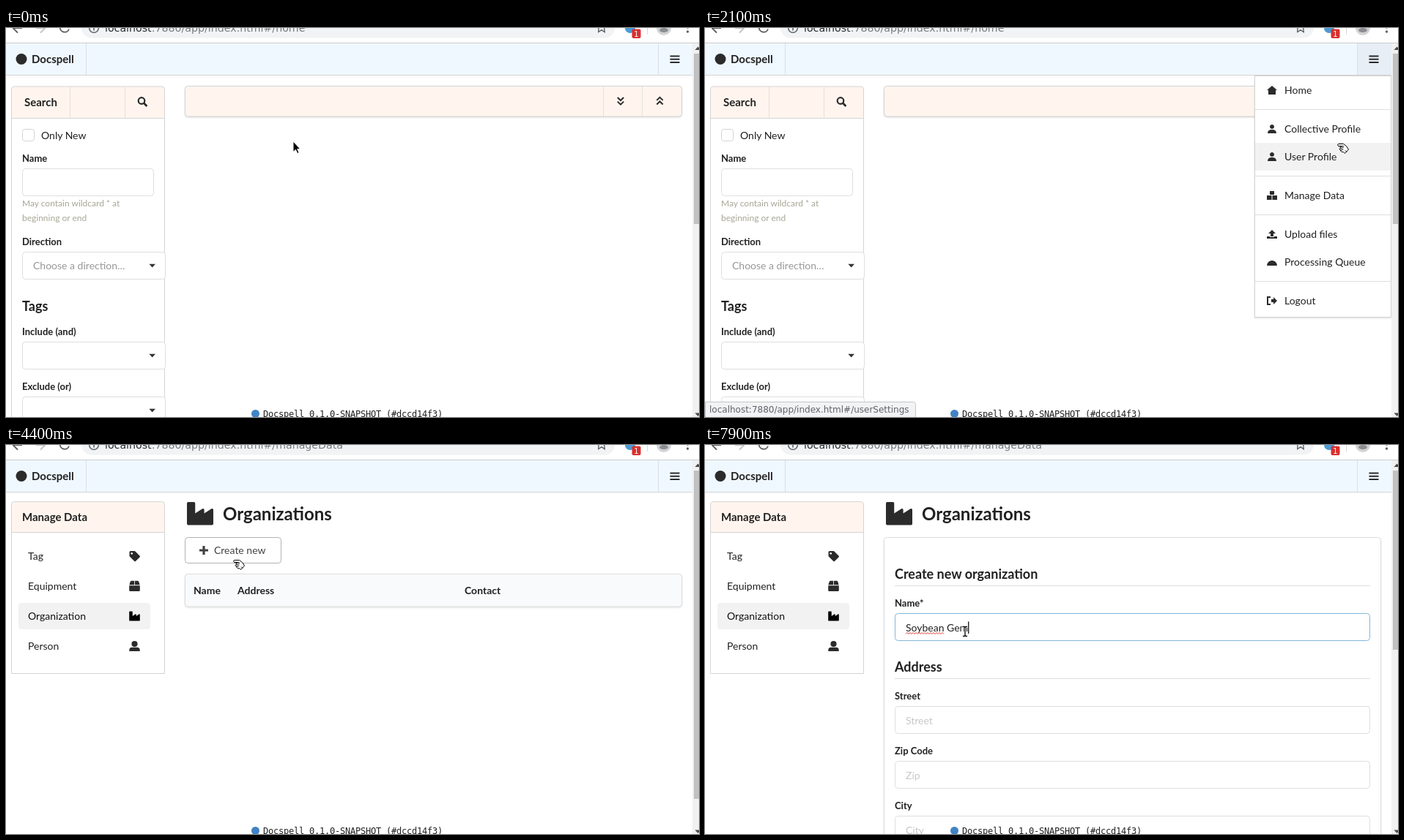
Write an HTML page that moves like this. It is 946 px wide and 532 px high and loops after 8 s.

```html
<!DOCTYPE html>
<html lang="en">
<head>
<meta charset="utf-8">
<title>Manage Data</title>
<style>
  html, body { margin: 0; width: 100%; height: 100%; overflow: hidden; background: #fff; }
  svg { display: block; }
  text { font: 14px Lato, sans-serif; fill: #212121; white-space: pre; }
  .b13 { font-weight: 700; font-size: 13px; }
  .b14 { font-weight: 700; }
  .b15 { font-weight: 700; font-size: 15px; }
  .b18 { font-weight: 700; font-size: 18px; }
  .b24 { font-weight: 700; font-size: 24px; }
  .hint { font-size: 12px; fill: #a8a696; }
  .ph { fill: #c7c7c7; }
  .ui { font-family: "DejaVu Sans", sans-serif; }
  .mono { font: 12px "DejaVu Sans Mono", monospace; letter-spacing: -.224px; }
  .box { fill: #fff; stroke: #dededf; }
  .card { fill: #fff; stroke: #d4d4d5; }
  .warm { fill: #fff5ee; stroke: #d4d4d5; }
  .rule { stroke: #dededf; fill: none; }
  .lift { filter: drop-shadow(0 1px 1px rgba(34,36,38,.15)); }
  .pop { filter: drop-shadow(0 1px 2px rgba(0,0,0,.35)); }
  .ico { fill: #2b2b2b; }
  .line { fill: none; stroke: #2b2b2b; stroke-width: 2; }
</style>
</head>
<body>
<svg width="946" height="532" viewBox="0 0 946 532">
  <defs>
    <path id="industry" d="M475 164L336 252V184C336 165 315 154 299 164L160 252V56Q160 32 136 32H24Q0 32 0 56V456Q0 480 24 480H488Q512 480 512 456V184C512 165 491 154 475 164Z"/>
    <path id="drop" d="M0 0h8.6l-4.3 4.6z" fill="#333"/>
    <path id="chevrons" class="line" d="M.8 1l4.2 4 4.2-4M.8 6.6l4.2 4 4.2-4"/>
  </defs>

  <!-- browser bar -->
  <rect x="103" y="-15" width="728" height="28.500" rx="14" fill="#f1f3f4"/>
  <g fill="none" stroke="#5f6368" stroke-width="1.900">
    <path d="M16 6.500L9.500 0M9 0H22"/>
    <path d="M47 6.500L53.500 0M41 0H54" stroke="#c4c6c8"/>
    <path d="M73.800-1A6.300 6.300 0 0 0 86 1.500"/>
    <circle cx="120" cy="0" r="6.300" stroke-width="1.500"/>
    <path d="M120-1v4.500" stroke-width="1.600"/>
    <path d="M809-2.500L808.800 5.500 813 2.700 817.200 5.500 816.500-2.500" stroke-width="1.400"/>
  </g>
  <text class="ui" x="135" y="5" style="font-size:14.200px;fill:#777b80"><tspan fill="#27292c">localhost</tspan>:7880/app/index.html#/<tspan id="page">home</tspan></text>
  <circle cx="852" cy="0" r="7" fill="#4a9bd4"/>
  <rect x="854.500" y="1.500" width="12" height="12.500" rx="2" fill="#d8302f"/>
  <text class="ui" x="857.300" y="11.500" style="font-size:10px;fill:#fff">1</text>
  <path d="M875.500 0V9" stroke="#d5d7da"/>
  <circle cx="898" cy="0" r="10" fill="#d2d3d5"/>
  <ellipse cx="898" cy="3" rx="6" ry="3" fill="#8b8d90"/>
  <circle cx="930.500" cy="5" r="1.700" fill="#5f6368"/>
  <circle cx="930.500" cy="-1" r="1.700" fill="#5f6368"/>

  <!-- page header -->
  <rect y="20" width="946" height="1" fill="#c9cbcd"/>
  <rect y="21" width="937" height="43" fill="#f0f8ff"/>
  <rect id="barsBg" x="891" y="21" width="46" height="43" fill="#000" opacity=".04"/>
  <path d="M0 64.500H937" stroke="#d4d4d5"/>
  <path d="M109.500 21V64M890.500 21V64" stroke="#d9dfe5"/>
  <circle cx="21" cy="42.500" r="7.500" class="ico"/>
  <text class="b15" x="35" y="48">Docspell</text>
  <path d="M906.500 38.500h13M906.500 42.700h13M906.500 47h13" class="line"/>

  <!-- search page -->
  <g id="search">
    <path class="card" d="M7.500 120V540H216.500V120"/>
    <path class="warm" d="M7.500 123.500V84a4 4 0 0 1 4-4H212.500a4 4 0 0 1 4 4V123.500Z"/>
    <path d="M87.500 80V123M162.500 80V123" stroke="#e6dfd9"/>
    <text class="b15" x="25" y="107">Search</text>
    <g class="line" style="stroke-width:2.200"><circle cx="185" cy="99.500" r="4.300"/><path d="M188 102.600l4.400 4.400" stroke-width="2.800"/></g>
    <rect class="card" x="22.500" y="138.500" width="16" height="16" rx="3"/>
    <text x="48" y="152">Only New</text>
    <text class="b13" x="22" y="183">Name</text>
    <rect class="box" x="22.500" y="192.500" width="179" height="37" rx="4"/>
    <text class="hint" x="22" y="244">May contain wildcard * at</text>
    <text class="hint" x="22" y="264">beginning or end</text>
    <text class="b13" x="22" y="297">Direction</text>
    <rect class="box" x="22.500" y="306.500" width="195" height="37" rx="4"/>
    <text x="37" y="330" style="fill:#979797">Choose a direction…</text>
    <use href="#drop" x="195.400" y="322.800"/>
    <text class="b18" x="22" y="387">Tags</text>
    <text class="b13" x="22" y="420">Include (and)</text>
    <rect class="box" x="22.500" y="429.500" width="195" height="37" rx="4"/>
    <use href="#drop" x="195.400" y="445.800"/>
    <text class="b13" x="22" y="495">Exclude (or)</text>
    <rect class="box" x="22.500" y="504.500" width="195" height="37" rx="4"/>
    <use href="#drop" x="195.400" y="520.800"/>
    <rect class="warm lift" x="244.500" y="79.500" width="678" height="41.500" rx="4"/>
    <path d="M815.500 80V121M868.500 80V121" stroke="#e6dfd9"/>
    <use href="#chevrons" x="834" y="94"/>
    <use href="#chevrons" transform="translate(887.500 105.500) scale(1 -1)"/>
  </g>

  <!-- manage data page -->
  <g id="manage">
    <path class="card" d="M7.500 119.500V312.500H216.500V119.500"/>
    <path class="warm" d="M7.500 119.500V81.500a4 4 0 0 1 4-4H212.500a4 4 0 0 1 4 4V119.500Z"/>
    <text class="b15" x="22" y="104">Manage Data</text>
    <rect x="17" y="216" width="180" height="36" rx="4" fill="#f2f2f2"/>
    <text x="30" y="157">Tag</text>
    <text x="30" y="198">Equipment</text>
    <text x="30" y="239" style="fill:#111">Organization</text>
    <text x="30" y="280">Person</text>
    <path class="ico" fill-rule="evenodd" d="M168.500 146.500q0-1.500 1.500-1.500h5.500l1 .4 6 6q1 1 0 2l-5.400 5.400q-1 1-2 0l-6.200-6.200-.4-1zM171.700 146.900a1.400 1.400 0 1 0 .01 0z"/>
    <path class="ico" d="M168.300 191.300l1.400-4.300q.4-1.200 1.500-1.200h3.900v5.500zM182.700 191.300l-1.400-4.300q-.4-1.200-1.500-1.200h-3.900v5.500zM168.200 192.200h14.600v6.500q0 1.400-1.400 1.400h-11.800q-1.400 0-1.400-1.400z"/>
    <use href="#industry" transform="translate(168.200 226.700) scale(.0285)"/>
    <g class="ico"><circle cx="175.500" cy="272" r="4.100"/><path d="M168.300 282v-1.500q0-3.700 3.700-3.700h7q3.700 0 3.700 3.700v1.500z"/></g>
    <use href="#industry" class="ico" transform="translate(247 75.700) scale(.0703)"/>
    <text class="b24" x="296" y="102.500">Organizations</text>

    <g id="list">
      <rect id="btn" class="box" x="244.500" y="126.500" width="131" height="35" rx="4"/>
      <g id="btnFg"><path d="M264 144h12M270 138v12" stroke="#000" stroke-width="3.200"/>
      <text x="284" y="149" style="fill:#000">Create new</text></g>
      <rect class="lift" x="244.500" y="176.500" width="678" height="44.500" rx="4" fill="#f9fafb" stroke="#dededf"/>
      <text class="b14" x="256" y="204">Name</text>
      <text class="b14" x="316" y="204">Address</text>
      <text class="b14" x="626" y="204">Contact</text>
    </g>

    <g id="form">
      <rect class="box lift" x="244.500" y="126.500" width="678" height="430" rx="4"/>
      <text class="b18" x="259" y="183">Create new organization</text>
      <path class="rule" d="M259 192.500H908M259 319.500H908"/>
      <text class="b13" id="label" x="259" y="221">Name*</text>
      <rect id="field" x="259.500" y="230.500" width="648" height="37" rx="4"/>
      <text id="ph" x="274" y="255" style="fill:#e7bdbc">Name</text>
      <text id="typed" x="274" y="255"></text>
      <path id="wave" fill="none" stroke="#e0362c"/>
      <rect id="caret" y="241.500" width="1.200" height="16.500" fill="#000"/>
      <text class="b18" x="259" y="310">Address</text>
      <text class="b13" x="259" y="348">Street</text>
      <rect class="box" x="259.500" y="357.500" width="648" height="37" rx="4"/>
      <text class="ph" x="274" y="382">Street</text>
      <text class="b13" x="259" y="423">Zip Code</text>
      <rect class="box" x="259.500" y="432.500" width="648" height="37" rx="4"/>
      <text class="ph" x="274" y="457">Zip</text>
      <text class="b13" x="259" y="498">City</text>
      <rect class="box" x="259.500" y="507.500" width="648" height="37" rx="4"/>
      <text class="ph" x="274" y="532">City</text>
    </g>
    <g id="fill">
      <rect class="pop" x="258" y="268" width="204" height="116" rx="2" fill="#fff"/>
      <rect x="258" y="343" width="204" height="41" rx="2" fill="#f8f9fa"/>
      <path d="M258 343.500H462" stroke="#e6e8ea"/>
      <text class="ui" x="270" y="299" style="fill:#2c2c2c">Trial Collective</text>
      <text class="ui" x="269" y="321" style="font-size:13px;fill:#6e7073">Dosenstrasse 38</text>
      <text class="ui" x="270" y="369" style="fill:#6e7073">Adressen verwalten…</text>
    </g>
  </g>

  <circle cx="340.500" cy="527.500" r="5.500" fill="#4183c4"/>
  <text class="mono" x="351" y="531.500">Docspell 0.1.0-SNAPSHOT (#dccd14f3)</text>

  <g id="menu">
    <rect class="lift" x="750.500" y="65.500" width="186" height="330" fill="#fff" stroke="#d4d4d5"/>
    <rect id="hover" x="751" width="185" height="38" fill="#f2f2f2"/>
    <g id="rows"></g>
  </g>
  <g id="status">
    <path id="bubble" fill="#f1f3f4" stroke="#c3c5c8"/>
    <text id="link" class="ui" x="6" y="526" style="font-size:12px;fill:#5f6368"></text>
  </g>

  <!-- scrollbar -->
  <rect x="937" y="21" width="9" height="511" fill="#f1f1f1"/>
  <path d="M940.500 30l4-4.500 4 4.500zM940.500 526.500l4 4.500 4-4.500z" fill="#4a4a4a"/>
  <rect id="thumb" x="939" y="35" width="7"/>

  <!-- pointers -->
  <g id="pointer" stroke-linejoin="round">
    <path id="arrow" d="M1 1V15.500L4.400 12.400 6.800 17.600 9 16.600 6.700 11.600H10.800Z" fill="#000" stroke="#fff"/>
    <g id="hand" fill="#fff" stroke="#000">
      <path d="M.5 2.500L2 1.500H8.500L12.500 4.500 15.500 9 10.500 14.500 8.500 12.500H6L4.700 11 5.300 10H4L3.200 8.300 5 7.500 3.700 6 7 4.500H1.500Z"/>
      <path d="M7 4.500l2 .5M5 7.500l3.500-1M5.300 10l3-1M11 10.500l2 2" fill="none"/>
    </g>
    <g id="beam" fill="none">
      <path d="M-3-6.500h2L0-5.500 1-6.500h2M0-5.500V5.500M-3 6.500h2L0 5.500 1 6.500h2" stroke="#fff" stroke-width="3"/>
      <path d="M-3-6.500h2L0-5.500 1-6.500h2M0-5.500V5.500M-3 6.500h2L0 5.500 1 6.500h2" stroke="#000" stroke-width="1.300"/>
    </g>
  </g>
</svg>
<script>
const $ = id => document.getElementById(id);
const show = (id, on) => $(id).style.display = on ? '' : 'none';
const set = (id, attrs) => { for (const k in attrs) $(id).setAttribute(k, attrs[k]); };

const LOOP = 8000, STEP = 100;
const COMPANY = 'Soybean Gem';
const KEYS = [5700, 5900, 6000, 6400, 6500, 7000, 7200, 7400, 7500, 7700, 7900];

// pointer legs: first step, last step, end point
const LEGS = [
  [400, 400, 392, 155], [600, 1100, 940, 58], [1200, 1300, 902, 42],
  [1800, 2400, 837, 232], [2800, 3200, 32, 234], [3500, 3900, 284, 163],
  [4200, 4400, 310, 156], [4700, 5000, 355, 255]
];

// menu rows: top, label, page, icon
const ROWS = [
  [66, 'Home', 'home', 'M0 6L7 0 14 6H12V12H2V6Z'],
  [119, 'Collective Profile', 'collectiveSettings', 'M1 12Q1 7 7 7T13 12ZM7 0a3 3 0 1 0 .01 0Z'],
  [157, 'User Profile', 'userSettings', 'M1 12Q1 7 7 7T13 12ZM7 0a3 3 0 1 0 .01 0Z'],
  [210, 'Manage Data', 'manageData', 'M4 0H10V5H4ZM0 6H6.500V12H0ZM7.500 6H14V12H7.500Z'],
  [263, 'Upload files', 'upload', 'M7 0L12 5H9V9H5V5H2ZM0 9H4V10H10V9H14V12H0Z'],
  [301, 'Processing Queue', 'queue', 'M0 11A7 7 0 1 1 14 11Z'],
  [354, 'Logout', 'login', 'M0 0H5V2H2V10H5V12H0ZM6 4H9V1L14 6 9 11V8H6Z']
];
$('rows').innerHTML = ROWS.map(([y, label, , icon]) =>
  `<path class="ico" d="${icon}" transform="translate(767 ${y + 13})"/><text x="791" y="${y + 24}">${label}</text>`).join('') +
  [111.5, 202.5, 255.5, 346.5].map(y => `<path class="rule" d="M751 ${y}H936"/>`).join('');
set('wave', { d: 'M274 258.500' + 'l2-2l2 2'.repeat(13) });

function pointerAt(t) {
  let x = 391, y = 154;
  for (const [from, to, ex, ey] of LEGS) {
    if (t < from) break;
    const u = Math.min(1, (t - from + STEP) / (to - from + STEP));
    const e = u * u * (3 - 2 * u);
    x += (ex - x) * e;
    y += (ey - y) * e;
  }
  return [Math.round(x), Math.round(y)];
}

function draw(t) {
  const [x, y] = pointerAt(t);
  const managing = t >= 2700, editing = t >= 4600;
  const menuOpen = t >= 1500 && !managing;
  const typing = t >= KEYS[0];

  show('search', !managing);
  show('manage', managing);
  show('list', !editing);
  show('form', editing);
  show('fill', t >= 5100 && !typing);
  $('page').textContent = managing ? 'manageData' : 'home';
  show('barsBg', t >= 1200 && !managing);

  const row = menuOpen && ROWS.find(r => y >= r[0] && y < r[0] + 38);
  show('menu', menuOpen);
  show('hover', row);
  show('status', row);
  if (row) {
    set('hover', { y: row[0] });
    $('link').textContent = 'localhost:7880/app/index.html#/' + row[2];
    const w = Math.round($('link').getComputedTextLength()) + 14.5;
    set('bubble', { d: `M.5 533V511.500H${w - 3}q3 0 3 3V533` });
  }

  const bottom = editing ? 280 : managing ? 484 : 268;
  set('thumb', { height: bottom - 35, fill: !managing && x >= 937 ? '#a8a8a8' : '#c1c1c1' });

  const hot = t >= 4300 ? 1 : t >= 4200 ? .5 : 0;
  set('btn', { style: `stroke:rgba(34,36,38,${.15 + .2 * hot})` });
  set('btnFg', { opacity: .56 + .18 * hot });

  const count = KEYS.filter(k => t >= k).length;
  $('typed').textContent = COMPANY.slice(0, count);
  show('ph', !typing);
  show('wave', count > 7);
  show('caret', t >= 5100);
  if (t >= 5100) set('caret', { x: 274 + (count ? $('typed').getComputedTextLength() : 0) });
  set('label', { style: typing ? '' : 'fill:#9f3a38' });
  set('field', {
    fill: typing ? '#fff' : '#fff6f6',
    stroke: t >= 5800 ? '#85b7d9' : typing ? '#b3b6c7' : '#e0b4b4'
  });

  const hand = (t >= 1200 && t < 2700) || (t >= 3200 && t < 3700) || (t >= 4200 && t < 4600);
  const beam = t >= 4900;
  show('hand', hand);
  show('beam', beam);
  show('arrow', !hand && !beam);
  set('pointer', { transform: `translate(${x} ${y})` });
}

const start = performance.now();
let last = -1;
function tick() {
  const t = Math.floor((performance.now() - start) % LOOP / STEP) * STEP;
  if (t !== last) draw(last = t);
  requestAnimationFrame(tick);
}
tick();
</script>
</body>
</html>
```
